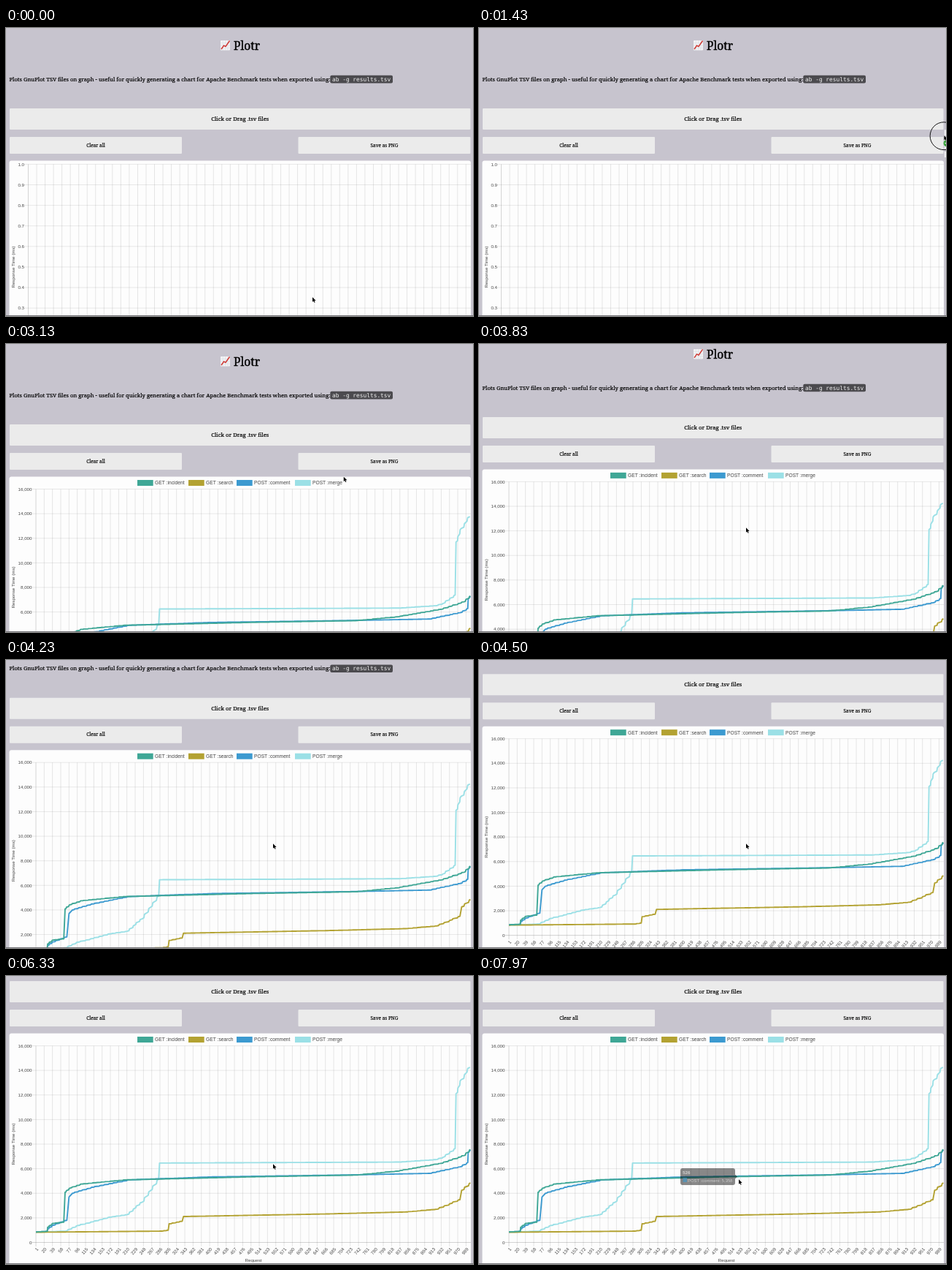
Animation of 640x394 px, one loop 8 s. Source, as an HTML page with a canvas:

```html
<!DOCTYPE html>
<html lang="en">
<head>
<meta charset="utf-8">
<title>Plotr</title>
<style>
html, body { margin: 0; width: 100%; height: 100%; overflow: hidden; background: #c7c4ce; }
canvas { display: block; width: 640px; height: 394px; }
</style>
</head>
<body>
<canvas id="stage" width="640" height="394"></canvas>
<script>
const ctx = document.getElementById('stage').getContext('2d');
const LOOP = 8000, W = 640, H = 394;
const SERIF = '"Noto Serif", serif';
const SANS = '"Liberation Sans", Arial, sans-serif';
const MONO = '"DejaVu Sans Mono", monospace';
const DROP = 2430, LOAD = 2560;
const LEFT = 41, RIGHT = 637, TOP = 198.5, BASE = 467.5, MAX = 16000;

// Key points are request number and response time; stairs fill the gaps
const series = [
  { name: 'GET :incident', color: '#3fa796', x: 180, keys: [[1, 860], [27, 900], [28, 1240], [40, 1550],
    [65, 1650], [68, 4080], [80, 4430], [105, 4750], [205, 5090], [500, 5340], [735, 5480], [830, 5800],
    [930, 6430], [985, 7070], [999, 7560]] },
  { name: 'GET :search', color: '#b3a232', x: 250, keys: [[1, 830], [290, 920], [305, 1000], [307, 1520],
    [337, 1720], [340, 2110], [670, 2320], [850, 2480], [922, 2700], [975, 3480], [979, 4250], [999, 4850]] },
  { name: 'POST :comment', color: '#3c9ad0', x: 316, keys: [[1, 850], [27, 900], [28, 1100], [40, 1400],
    [72, 1800], [77, 3700], [85, 4000], [130, 4490], [215, 5090], [400, 5330], [730, 5500], [905, 5620],
    [975, 6150], [993, 6500], [994, 7300], [999, 7530]] },
  { name: 'POST :merge', color: '#9be0e6', x: 396, keys: [[1, 830], [70, 920], [98, 1380], [170, 2050],
    [210, 2260], [245, 3270], [283, 5150], [285, 6460], [835, 6540], [920, 6740], [938, 6950],
    [964, 7640], [966, 12100], [978, 13250], [998, 14250]] }
];
const files = ['GET /incident', 'GET /search', 'POST /comment', 'POST /merge'];

const moves = [
  { from: 30, to: 230, x: 516, y: 204 },
  { from: 470, to: 850, x: 645, y: 150 },
  { from: 1300, to: 2060, x: 548, y: 121 },
  { from: 2700, to: 3600, x: 366, y: 252 },
  { from: 5500, to: 6250, x: 366, y: 258 },
  { from: 7100, to: 7930, x: 356, y: 279 }
];

const clamp = v => Math.max(0, Math.min(1, v));
const smooth = v => v * v * (3 - 2 * v);
const outQuart = v => 1 - Math.pow(1 - v, 4);

function randomizer(seed) {
  return () => (seed = seed * 16807 % 2147483647) / 2147483647;
}

// Sorted timings sit on short plateaus joined by quick rises
function stairs(keys) {
  const random = randomizer(71), pts = [keys[0]];
  for (let i = 1; i < keys.length; i++) {
    const [n0, v0] = keys[i - 1], [n1, v1] = keys[i];
    const count = Math.ceil((n1 - n0) / 11);
    const dn = (n1 - n0) / count, dv = (v1 - v0) / count;
    for (let k = 0; k < count && count > 1; k++) {
      const n = n0 + dn * (k + 0.3 + random() * 0.3), v = v0 + dv * k;
      pts.push([n, v + dv * 0.2], [n + dn * 0.15, v + dv * 0.8]);
    }
    pts.push(keys[i]);
  }
  return pts;
}
for (const s of series) s.points = stairs(s.keys);

function pointer(t) {
  let x = 420, y = 369;
  for (const m of moves) {
    const k = smooth(clamp((t - m.from) / (m.to - m.from)));
    x += (m.x - x) * k;
    y += (m.y - y) * k;
  }
  return [x, y];
}

function text(str, x, y, font, color = '#111', align = 'left') {
  ctx.font = font;
  ctx.fillStyle = color;
  ctx.textAlign = align;
  ctx.fillText(str, x, y);
}

function serif(str, x, y, size, align) {
  text(str, x, y, size + 'px ' + SERIF, '#000', align);
  ctx.strokeStyle = '#000';
  ctx.lineWidth = size * 0.025;
  ctx.strokeText(str, x, y);
}

function box(x, y, w, h, r, color) {
  ctx.fillStyle = color;
  ctx.beginPath();
  ctx.roundRect(x, y, w, h, r);
  ctx.fill();
}

function disc(x, y, r, color) {
  ctx.fillStyle = color;
  ctx.beginPath();
  ctx.arc(x, y, r, 0, 7);
  ctx.fill();
}

function path(pts, color, width) {
  ctx.strokeStyle = color;
  ctx.lineWidth = width;
  ctx.beginPath();
  for (const [x, y] of pts) ctx.lineTo(x, y);
  ctx.stroke();
}

const line = (x1, y1, x2, y2, color, width) => path([[x1, y1], [x2, y2]], color, width);

function spun(str, x, y, angle, align) {
  ctx.save();
  ctx.translate(x, y);
  ctx.rotate(angle);
  text(str, 0, 2.2, '6.2px ' + SANS, '#444', align);
  ctx.restore();
}

function header() {
  box(294, 17, 13, 13.5, 1, '#f4f3f5');
  for (let i = 1; i < 4; i++) {
    line(294, 17 + i * 3.4, 307, 17 + i * 3.4, '#cfd8df', 0.5);
    line(294 + i * 3.3, 17, 294 + i * 3.3, 30.5, '#cfd8df', 0.5);
  }
  path([[295, 29], [298.5, 24], [301, 25.3], [306.5, 17.5]], '#cf3b36', 1.5);
  serif('Plotr', 312, 30, 15.6);

  serif('Plots GnuPlot TSV files on graph - useful for quickly generating a chart for Apache Benchmark tests when exported using:',
    4.5, 72.8, 7.64);
  box(444.3, 64.8, 85.7, 10.6, 2, '#4b4a4e');
  text('ab -g results.tsv', 447, 72.8, '7.85px ' + MONO, '#f2f2f2');

  button(5, 110, 631.5, 29, 'Click or Drag .tsv files', 7.7);
  button(5, 149, 236, 23, 'Clear all', 6.5);
  button(400.5, 149, 236, 23, 'Save as PNG', 6.5);
}

function button(x, y, w, h, label, size) {
  box(x, y, w, h, 1, '#ebebeb');
  serif(label, x + w / 2, y + h / 2 + size * 0.35, size, 'center');
}

function grid(left, top, ticks) {
  const step = (RIGHT - left) / 999 * 19;
  for (let i = 0; i < 53; i++) {
    const x = left + i * step;
    line(x, top, x, BASE + 5.5, i ? 'rgba(0,0,0,.125)' : 'rgba(0,0,0,.2)', 0.8);
    spun(String(1 + i * 19), x + 2, BASE + 8, -0.87, 'right');
  }
  ticks.forEach((label, i) => {
    const y = top + (BASE - top) * i / (ticks.length - 1);
    const last = i === ticks.length - 1;
    line(left - 5.5, y, RIGHT, y, last ? 'rgba(0,0,0,.22)' : 'rgba(0,0,0,.11)', 0.8);
    text(label, left - 5.5, y + 2.2, '6.2px ' + SANS, '#444', 'right');
  });
  spun('Response Time (ms)', 10.2, (top + BASE) / 2, -Math.PI / 2, 'center');
  text('Request', (left + RIGHT) / 2, 494.3, '6.2px ' + SANS, '#444', 'center');
}

function chart(t) {
  box(4.5, 181.5, 632.5, 330, 3, '#fdfdfd');
  if (t < LOAD) {
    grid(30.5, 186.4, Array.from({ length: 11 }, (_, i) => (1 - i / 10).toFixed(1)));
    return;
  }
  grid(LEFT, TOP, Array.from({ length: 9 }, (_, i) => (MAX - i * 2000).toLocaleString('en-US')));
  for (const s of series) {
    box(s.x, 186, 21.7, 8, 0, s.color);
    text(s.name, s.x + 24, 192.4, '6.7px ' + SANS, '#444');
  }
  const rise = outQuart(clamp((t - LOAD) / 1000));
  const place = ([n, v]) => [LEFT + (n - 1) * (RIGHT - LEFT) / 999, BASE - v / MAX * (BASE - TOP) * rise];
  ctx.lineJoin = 'round';
  for (const s of [...series].reverse()) path(s.points.map(place), s.color, 1.9);
}

function tooltip(alpha) {
  if (alpha <= 0) return;
  ctx.save();
  ctx.globalAlpha = alpha;
  ctx.fillStyle = 'rgba(0,0,0,.8)';
  ctx.beginPath();
  ctx.roundRect(276, 263, 75, 23, 3);
  ctx.moveTo(351, 271.5);
  ctx.lineTo(354, 274.5);
  ctx.lineTo(351, 277.5);
  ctx.fill();
  text('526', 279, 271.3, 'bold 6.2px ' + SANS, '#fff');
  box(279.5, 276, 5.5, 6, 0, '#3c9ad0');
  text('POST :comment: 5,358', 286, 281.6, '5.9px ' + SANS, '#fff');
  ctx.restore();
}

function arrow(x, y) {
  ctx.save();
  ctx.translate(x, y - 0.7);
  ctx.scale(0.93, 0.93);
  ctx.beginPath();
  [[0, 0], [0, 7], [1.6, 5.6], [2.7, 8], [3.9, 7.5], [2.8, 5.1], [5, 5]].forEach(p => ctx.lineTo(...p));
  ctx.closePath();
  ctx.lineWidth = 1;
  ctx.strokeStyle = '#fff';
  ctx.stroke();
  ctx.fillStyle = '#000';
  ctx.fill();
  ctx.restore();
}

function dragged(x, y) {
  ctx.save();
  ctx.translate(x, y);
  files.forEach((name, i) => {
    const top = -9 + i * 9.9;
    const font = 'italic 6.3px ' + SANS;
    ctx.font = font;
    box(0.5, top + 0.5, 6, 8, 0.5, 'rgba(250,250,252,.85)');
    box(8, top, ctx.measureText(name).width + 5, 8.6, 4, '#1f5dcb');
    text(name, 10.3, top + 6.5, font, '#fff');
  });
  ctx.strokeStyle = '#111';
  ctx.lineWidth = 1;
  ctx.beginPath();
  ctx.arc(-0.3, 0, 18.9, 0, 7);
  ctx.stroke();
  disc(14.5, 9, 4.6, '#e23b35');
  text('4', 14.5, 11.3, '6.5px ' + SANS, '#fff', 'center');
  disc(4, 10, 4.8, '#3aa63c');
  line(1.3, 10, 6.7, 10, '#fff', 1.2);
  line(4, 7.3, 4, 12.7, '#fff', 1.2);
  ctx.restore();
}

function draw(t) {
  ctx.fillStyle = '#c7c4ce';
  ctx.fillRect(0, 0, W, H);
  ctx.save();
  ctx.translate(0, -103 * clamp((t - 3747) / 855));
  header();
  chart(t);
  ctx.restore();

  tooltip(0.58 * clamp((t - 7880) / 90));
  ctx.fillStyle = '#77767a';
  ctx.fillRect(0, 393, W, 1);

  const [x, y] = pointer(t);
  if (t > 1200 && t < DROP) dragged(x, y);
  arrow(x, y);
}

function tick(now) {
  draw(now % LOOP);
  requestAnimationFrame(tick);
}
draw(0);
requestAnimationFrame(tick);
</script>
</body>
</html>
```
